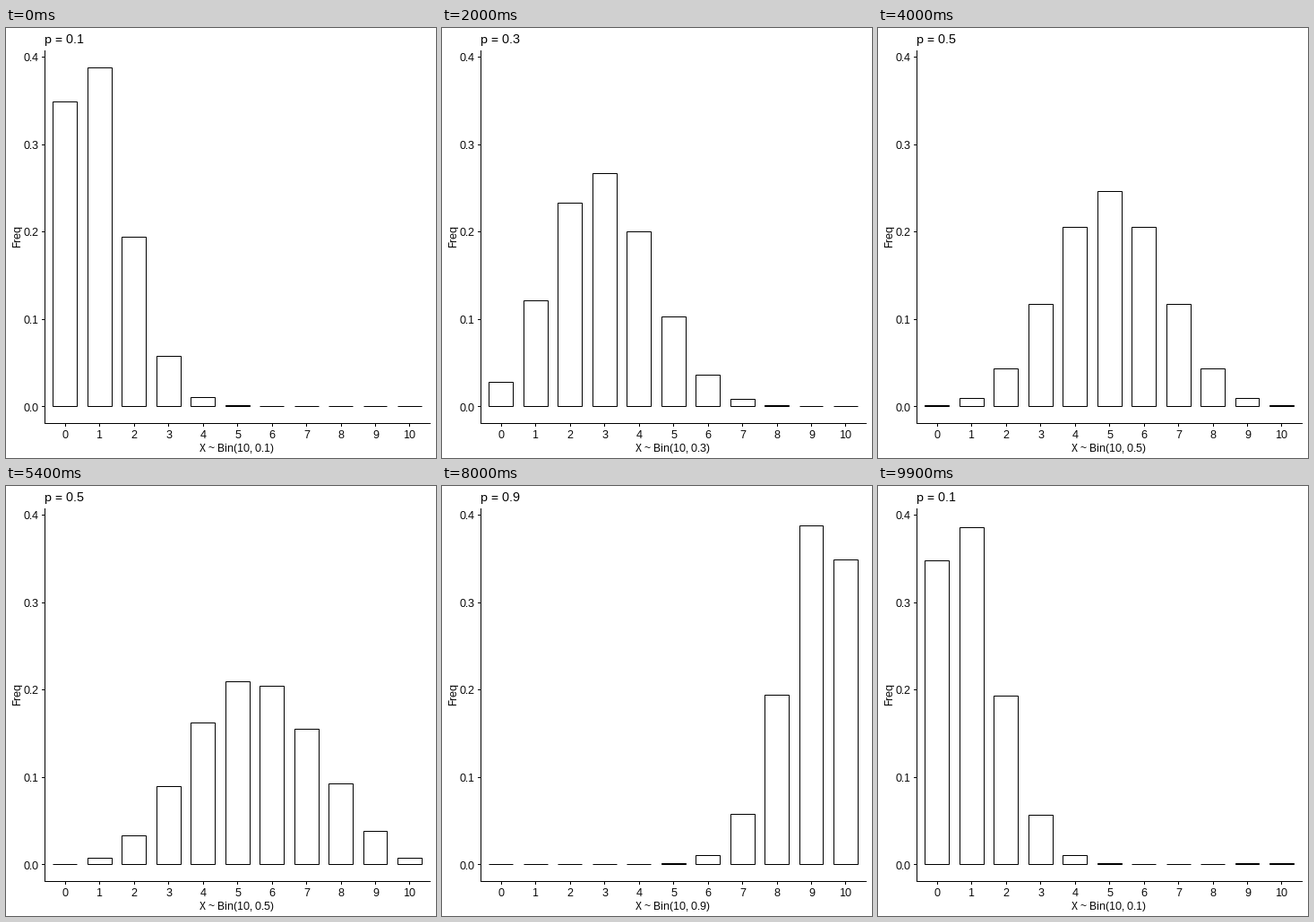
Recreate the animation shown at these times as a matplotlib script. Size 480x480 px, loop 10 s.

```python
from math import comb

import matplotlib.pyplot as plt
from matplotlib.animation import FuncAnimation
from matplotlib.lines import Line2D
from matplotlib.patches import Rectangle

plt.rcParams.update({
    "font.family": "Liberation Sans",
    "text.hinting": "native",
    "text.hinting_factor": 1,
})

SIZE, DPI = 480, 96
PX = 72 / DPI  # one pixel in points
TRIALS = 10
PROBS = (0.1, 0.3, 0.5, 0.7, 0.9)
HOLD, MOVE = 10, 10
STEP = HOLD + MOVE

ZERO_Y, SCALE_Y = 422.4, 976
FIRST_X, PITCH = 65.86, 38.46
BAR_W = 0.7 * PITCH
LEFT, RIGHT, TOP, BOTTOM = 43, 473, 25, 441


def binomial(p):
    return [comb(TRIALS, k) * p**k * (1 - p) ** (TRIALS - k)
            for k in range(TRIALS + 1)]


def cubic_in_out(t):
    return 4 * t**3 if t < 0.5 else 1 - 4 * (1 - t) ** 3


def row(value):
    return round(ZERO_Y - SCALE_Y * value)


fig = plt.figure(figsize=(SIZE / DPI, SIZE / DPI), dpi=DPI, facecolor="white")
ax = fig.add_axes([0, 0, 1, 1])
ax.set_xlim(0, SIZE)
ax.set_ylim(SIZE, 0)
ax.axis("off")


def line(x0, y0, x1, y1):
    ax.add_line(Line2D([x0, x1], [y0, y1], color="black", lw=PX, snap=True,
                       solid_capstyle="projecting"))


def label(x, y, text="", size=12, **kwargs):
    return ax.text(x, y, text, fontsize=size * PX, color="black",
                   va="baseline", **kwargs)


# Axes, ticks and fixed labels
line(LEFT, TOP, LEFT, BOTTOM)
line(LEFT, BOTTOM, RIGHT, BOTTOM)

for i in range(5):
    value = i / 10
    line(LEFT - 3, row(value), LEFT, row(value))
    label(37, round(ZERO_Y - SCALE_Y * value + 5.3), f"{value:.1f}", ha="right")

bars = []
for k in range(TRIALS + 1):
    x = FIRST_X + PITCH * k
    line(round(x), BOTTOM, round(x), BOTTOM + 3)
    label(x + 0.5, 458, str(k), ha="center")
    x0, x1 = round(x - BAR_W / 2), round(x + BAR_W / 2)
    bar = Rectangle((x0, row(0)), x1 - x0, 0, facecolor="white",
                    edgecolor="black", lw=PX, snap=True, joinstyle="miter")
    bars.append(ax.add_patch(bar))

ax.text(16, 245, "Freq", fontsize=12 * PX, rotation=90, color="black",
        ha="right", va="bottom", rotation_mode="anchor").set(
            ha="left", va="baseline")
title = label(43, 17, size=14, ha="left")
x_label = label(216, 473, ha="left")

STATES = [binomial(p) for p in PROBS]


def draw(frame):
    i, step = divmod(frame, STEP)
    j = (i + 1) % len(PROBS)
    t = max(0, step - HOLD) / MOVE
    ease = cubic_in_out(t)
    for bar, a, b in zip(bars, STATES[i], STATES[j]):
        top = row(a + (b - a) * ease)
        bar.set_y(top)
        bar.set_height(row(0) - top)
    p = PROBS[j if t > 0.5 else i]
    title.set_text(f"p = {p}")
    x_label.set_text(f"X ~ Bin({TRIALS}, {p})")
    return [*bars, title, x_label]


anim = FuncAnimation(fig, draw, frames=STEP * len(PROBS), interval=100,
                     repeat=True, repeat_delay=0)
plt.show()
```
